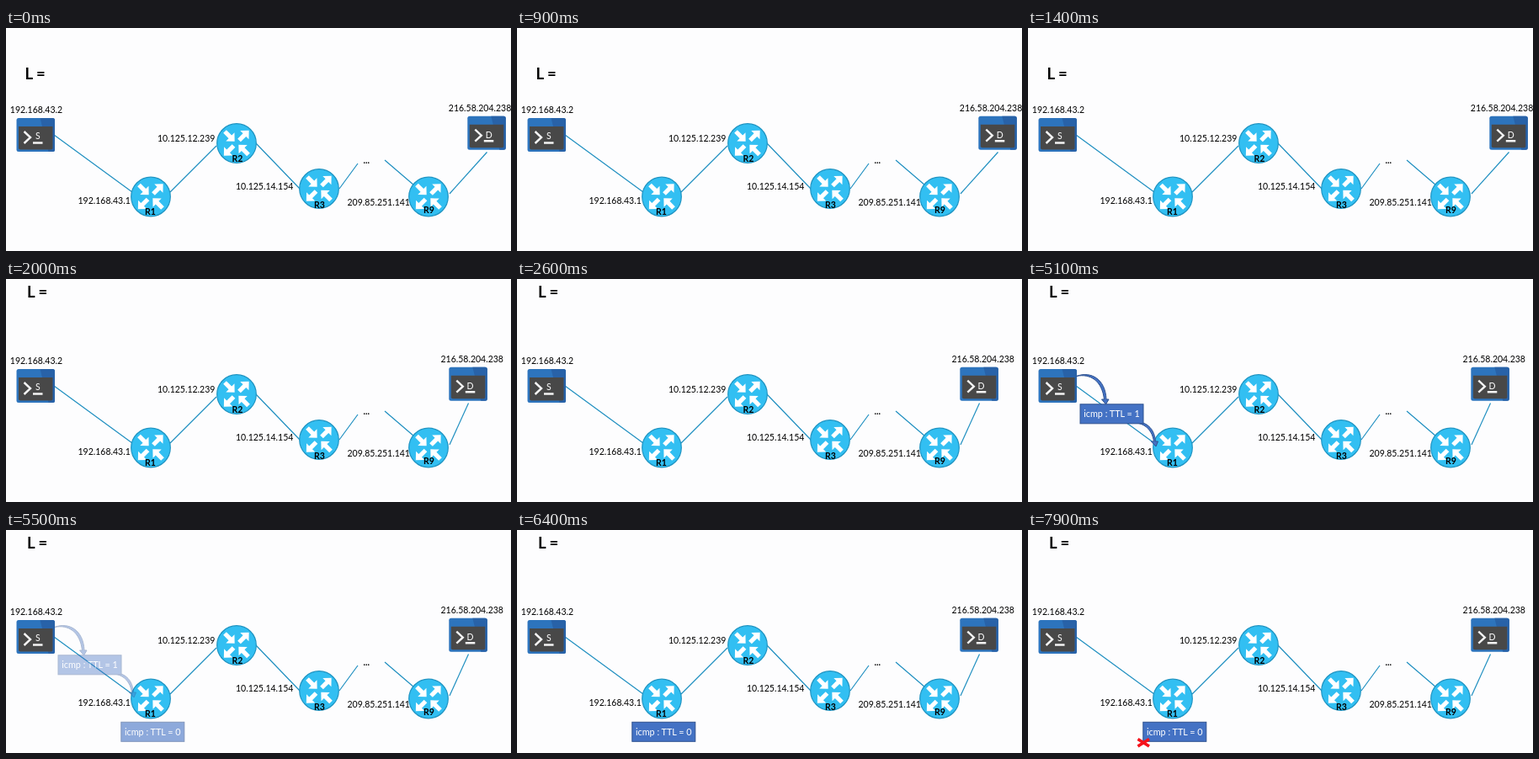
Write an HTML page that moves like this. It is 600 by 265 pixels and loops after 8 s.

```html
<!DOCTYPE html>
<html lang="en">
<head>
<meta charset="utf-8">
<title>Route tracing</title>
<style>
html, body { margin: 0; width: 100%; height: 100%; overflow: hidden; background: #fdfdfe; }
svg { display: block; width: 600px; height: 265px; }
text { font: 10.5px Lato, Carlito, sans-serif; fill: #000; }
.mid { text-anchor: middle; }
.bold { font-weight: 700; }
.title { font-size: 18.5px; }
.light { fill: #fff; }
.packet text { font-size: 10.8px; fill: #fff; }
.links { stroke: #1f8fc0; stroke-width: 1.2; fill: none; }
.shape { fill: #4472c4; stroke: #2f528f; }
.cross { stroke: #f5121b; stroke-width: 3.6; fill: none; }

.before, .after, .send, .expire, .cross { animation: 8s linear infinite; }
.before { animation-name: before; }
.after { animation-name: after; }
.send { animation-name: send; }
.expire { animation-name: expire; }
.cross { animation-name: cross; }
@keyframes before { 0%, 17.5% { opacity: 1 } 23.75%, 100% { opacity: 0 } }
@keyframes after { 0%, 17.5% { opacity: 0 } 23.75%, 100% { opacity: 1 } }
@keyframes send { 0%, 32.5% { opacity: 0 } 37.5%, 66.9% { opacity: 1 } 70%, 100% { opacity: 0 } }
@keyframes expire { 0%, 66.9% { opacity: 0 } 70%, 100% { opacity: 1 } }
@keyframes cross { 0%, 81.9% { opacity: 0 } 85%, 100% { opacity: 1 } }
</style>
</head>
<body>
<svg viewBox="0 0 600 265">
  <defs>
    <path id="arrow" d="M0-2.600H9V-7.200L16.500 0 9 7.200V2.600H0z" fill="#fff"/>
    <g id="router">
      <circle r="23.3" fill="#32bff2" stroke="#1f94c2" stroke-width="1.2"/>
      <use href="#arrow" transform="translate(3 -3.500) rotate(-45)"/>
      <use href="#arrow" transform="translate(-3.500 3) rotate(135)"/>
      <use href="#arrow" transform="translate(-14 -14) rotate(45)"/>
      <use href="#arrow" transform="translate(14 13.500) rotate(-135)"/>
    </g>
    <g id="terminal">
      <rect width="45.5" height="40" rx="2.5" fill="#2d74bd"/>
      <path d="M28 0H43a2.5 2.5 0 0 1 2.5 2.5V37.5a2.5 2.5 0 0 1-2.5 2.5H38z" fill="#2862a8"/>
      <path d="M2.5 10H43V35.5a2 2 0 0 1-2 2H4.5a2 2 0 0 1-2-2z" fill="#484848"/>
      <path d="M9 16l7.500 7L9 30M19.500 29.500H31" fill="none" stroke="#f4f4f4" stroke-width="2.400"/>
    </g>
  </defs>

  <g class="links">
    <path d="M57 127L150 195M195 195L250 140M297 137L349 191M396 191L418 161M450 157L485 187"/>
  </g>

  <use href="#terminal" x="12.5" y="107"/>
  <text class="mid light" x="37.800" y="131.500">S</text>
  <text x="4.8" y="101">192.168.43.2</text>

  <use href="#router" x="172" y="200.5"/>
  <use href="#router" x="274" y="137"/>
  <use href="#router" x="372" y="191"/>
  <use href="#router" x="502" y="200.5"/>
  <text class="mid bold" x="171.5" y="222">R1</text>
  <text class="mid bold" x="275" y="159">R2</text>
  <text class="mid bold" x="372.5" y="213.5">R3</text>
  <text class="mid bold" x="502.5" y="220">R9</text>
  <text x="85.5" y="208.5">192.168.43.1</text>
  <text x="180" y="135">10.125.12.239</text>
  <text x="273" y="192">10.125.14.154</text>
  <text x="405.5" y="211">209.85.251.141</text>
  <text class="mid bold" x="428.3" y="161">...</text>

  <g class="before">
    <text class="bold title" x="22.500" y="61.3">L =</text>
    <path class="links" d="M527 197L571.5 147.500"/>
    <use href="#terminal" x="548.3" y="104.7"/>
    <text class="mid light" x="573.800" y="130.5">D</text>
    <text x="525.8" y="99.3">216.58.204.238</text>
  </g>

  <g class="after">
    <text class="bold title" x="25" y="21.6">L =</text>
    <path class="links" d="M527 197L549.5 147.500"/>
    <use href="#terminal" x="526.3" y="104.7"/>
    <text class="mid light" x="551.500" y="130.5">D</text>
    <text x="516.5" y="99.3">216.58.204.238</text>
  </g>

  <g class="packet send">
    <path class="shape" d="M57.500 115.500C75 109 92 119 93 143H96L92.500 149 87.500 143H90.500C88 121 74 112 57.500 115.500z"/>
    <path class="shape" d="M119 171.500C136 166 150 174 151.500 193H154.500L152 199 146.500 193H149.500C147 176 134 168.500 119 171.500z"/>
    <rect class="shape" x="62" y="148.8" width="75" height="23"/>
    <text class="mid" x="99.5" y="164">icmp : TTL = 1</text>
  </g>

  <g class="packet expire">
    <rect class="shape" x="136.8" y="228.3" width="75" height="23"/>
    <text class="mid" x="174.3" y="244">icmp : TTL = 0</text>
  </g>

  <path class="cross" d="M130.5 248.5L144 257M144 248.5L130.5 257"/>
</svg>
</body>
</html>
```
